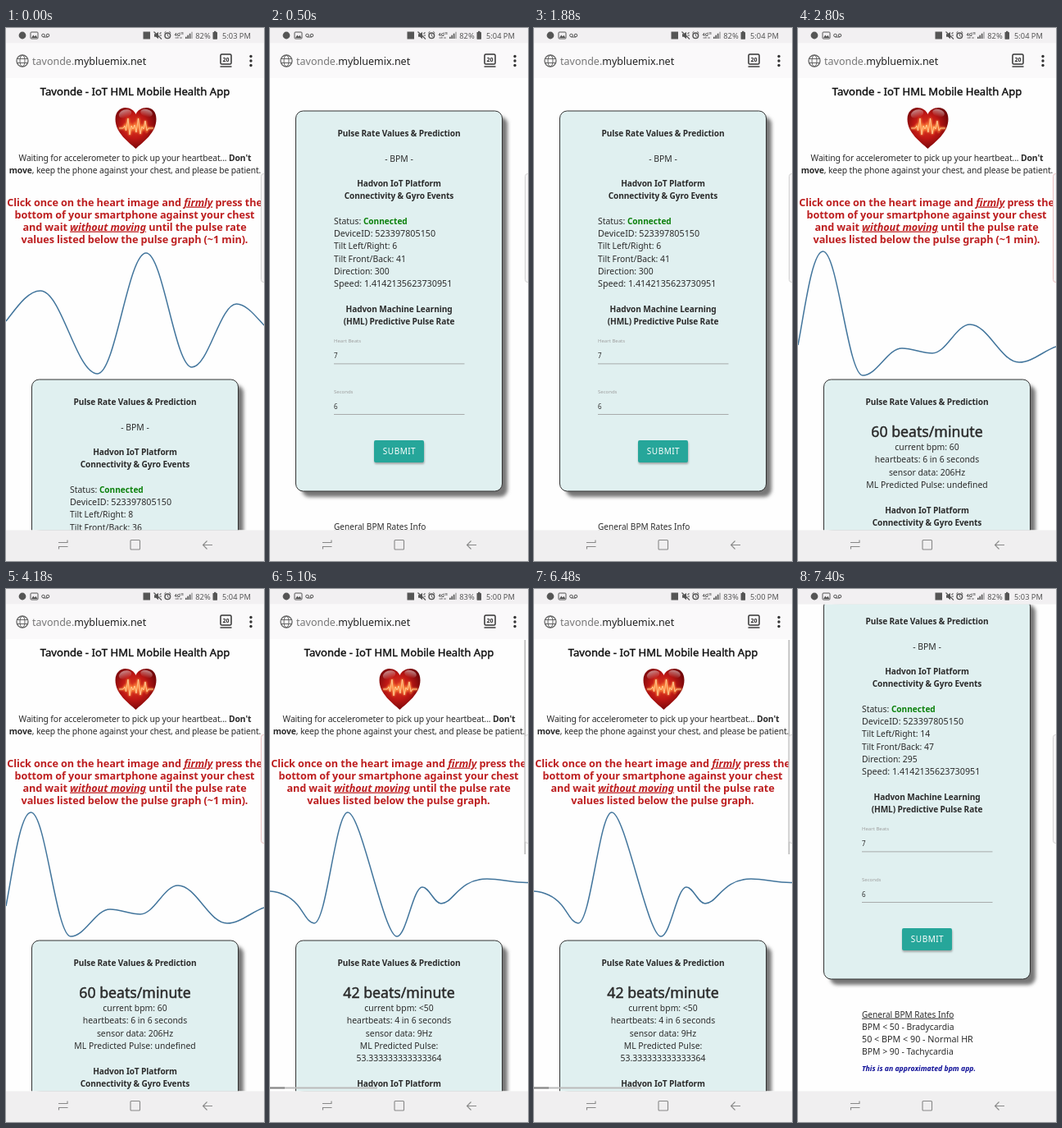
Write an HTML page that moves like this. It is 315x649 px and loops after 8 s.

```html
<!DOCTYPE html>
<html lang="en">
<head>
<meta charset="utf-8">
<title>Pulse app</title>
<style>
html, body { margin: 0; width: 100%; height: 100%; overflow: hidden; background: #fefefe; }
svg { display: block; width: 315px; height: 649px; }
text { font-family: "Noto Sans", "Open Sans", sans-serif; fill: #2b2b2b; font-size: 10.4px; }
.mid { text-anchor: middle; }
.para { letter-spacing: -.14px; }
.head { font-size: 10.1px; font-weight: 700; letter-spacing: -.1px; }
.title { font-size: 13.1px; fill: #111; stroke: #111; stroke-width: .4px; }
.red { font-size: 12.7px; font-weight: 700; letter-spacing: -.1px; fill: #bd1f20; }
.red tspan { font-style: italic; text-decoration: underline; }
.big { font-size: 17.7px; stroke: #2b2b2b; stroke-width: .45px; }
.num { font-size: 10.75px; }
.label { font-size: 6px; fill: #9e9e9e; }
.field { font-size: 8px; }
.btn { font-size: 10px; letter-spacing: .5px; fill: #fff; }
.under { font-size: 10.1px; text-decoration: underline; }
.note { font-size: 8.7px; font-weight: 700; font-style: italic; fill: #0b0b96; }
.ok { fill: #0b800b; font-weight: 700; font-size: 10.1px; }
.b { font-weight: 700; }
.url { font-size: 12.5px; fill: #777; }
.bar { font-size: 9.3px; fill: #555; }
</style>
</head>
<body>
<svg viewBox="0 0 315 649" xmlns="http://www.w3.org/2000/svg">
  <defs>
    <radialGradient id="heartFill" cx=".46" cy=".45" r=".6">
      <stop offset="0" stop-color="#e03a22"/>
      <stop offset=".5" stop-color="#bf1815"/>
      <stop offset="1" stop-color="#6c0508"/>
    </radialGradient>
    <linearGradient id="gloss" x2="0" y2="1">
      <stop offset="0" stop-color="#fff" stop-opacity=".5"/>
      <stop offset="1" stop-color="#fff" stop-opacity="0"/>
    </linearGradient>
    <filter id="soft" x="-10%" y="-10%" width="120%" height="120%"><feGaussianBlur stdDeviation="2"/></filter>
    <filter id="glow" x="-20%" y="-60%" width="140%" height="220%"><feGaussianBlur stdDeviation="1.3"/></filter>
    <clipPath id="view"><rect id="viewRect" x="0" y="61" width="315" height="551"/></clipPath>
  </defs>
  <rect width="315" height="649" fill="#fefefe"/>
  <g id="page" clip-path="url(#view)"></g>
  <g id="chrome"></g>
</svg>
<script>
const $ = id => document.getElementById(id);
const txt = (x, y, s, cls = "") => `<text x="${x}" y="${y}" class="${cls}">${s}</text>`;
const mid = (y, s, cls = "") => txt(157.5, y, s, "mid " + cls);
const red = (y, s) => txt(157, y, s, "mid red");
const rect = (x, y, w, h, fill, more = "") =>
  `<rect x="${x}" y="${y}" width="${w}" height="${h}" fill="${fill}" ${more}/>`;
const line = (d, color, w = 1, more = "") =>
  `<path d="${d}" fill="none" stroke="${color}" stroke-width="${w}" ${more}/>`;
const dot = (x, y, r, fill) => `<circle cx="${x}" cy="${y}" r="${r}" fill="${fill}"/>`;
const ring = (x, y, r, w = 1, color = "#666") =>
  `<circle cx="${x}" cy="${y}" r="${r}" fill="none" stroke="${color}" stroke-width="${w}"/>`;

// Smooth curve with level tangents at each crest and trough; a small k gives a straighter slope
function wave(start, peaks, end) {
  let d = start;
  peaks.slice(1).forEach(([x, y, k = .37], i) => {
    const [px, py] = peaks[i], dx = (x - px) * k;
    d += ` C${px + dx},${py} ${x - dx},${y} ${x},${y}`;
  });
  return line(d + end, "#42759c", 1.5);
}

function heart() {
  const ecg = "M138,122 h5 l2,-3 l1.5,6 l2.5,-15 l2,20 l2,-11 l2,4 l2,-5 l2,9 l2.5,-17 l2.5,19 l2,-9 l2,3 l2,-10 l2,12 l2,-3 h6";
  return `<path d="M158.5,147 C150,139 133.5,128 133.5,111 C133.5,102 139.5,97 145.5,97
    C151.5,97 156.5,100 158.5,105 C160.5,100 165.5,97 171.5,97 C178.5,97 183.5,102 183.5,111
    C183.5,128 167,139 158.5,147 Z" fill="url(#heartFill)"/>
    <ellipse cx="145.5" cy="104.5" rx="8" ry="5" fill="url(#gloss)" transform="rotate(-18 145.5 104.5)"/>
    <ellipse cx="171.5" cy="103.5" rx="7.5" ry="4.5" fill="url(#gloss)" transform="rotate(15 171.5 103.5)"/>`
    + line(ecg, "#ff8a3c", 2.6, 'filter="url(#glow)"')
    + line(ecg, "#ffe3b0", .7, 'stroke-linejoin="round"');
}

function header(lastLine) {
  return mid(82, "Tavonde - IoT HML Mobile Health App", "title") + heart()
    + mid(162, 'Waiting for accelerometer to pick up your heartbeat... <tspan class="b">Don\'t</tspan>', "para")
    + mid(177, '<tspan class="b">move</tspan>, keep the phone against your chest, and please be patient.', "para")
    + red(216.5, "Click once on the heart image and <tspan>firmly</tspan> press the")
    + red(231.5, "bottom of your smartphone against your chest")
    + red(246.5, "and wait <tspan>without moving</tspan> until the pulse rate")
    + red(261.5, lastLine);
}

function field(y, label, value) {
  return txt(78, y, label, "label") + txt(78, y + 19, value, "field")
    + rect(78, y + 25.5, 159.5, .8, "#9a9a9a");
}

function card(top, s) {
  const box = 'rx="9"';
  let out = rect(39, 7, 251, 463, "#777", box + ' filter="url(#soft)"')
    + rect(31.5, 0, 252, 463, "#e0f0f0", box + ' stroke="#333" stroke-width="1"')
    + mid(31, "Pulse Rate Values &amp; Prediction", "head");
  let y = 92;
  if (s.result) {
    const [rate, ...rows] = s.result;
    out += mid(70, rate + " beats/minute", "big");
    rows.forEach((r, i) => out += mid(86 + i * 15.3, r));
    y = 86 + rows.length * 15.3 + 15.3;
  } else out += mid(61.7, "- BPM -");
  out += mid(y, "Hadvon IoT Platform", "head") + mid(y + 15.2, "Connectivity &amp; Gyro Events", "head");
  if (s.gyro) {
    const [side, front, dir] = s.gyro;
    out += txt(78, 138, 'Status: <tspan class="ok">Connected</tspan>')
      + txt(78, 153, "DeviceID: 523397805150", "num")
      + txt(78, 168.3, "Tilt Left/Right: " + side)
      + txt(78, 183.5, "Tilt Front/Back: " + front)
      + txt(78, 198.7, "Direction: " + dir)
      + txt(78, 214, "Speed: 1.4142135623730951", "num")
      + mid(245, "Hadvon Machine Learning", "head")
      + mid(260, "(HML) Predictive Pulse Rate", "head")
      + field(282, "Heart Beats", 7) + field(343.5, "Seconds", 6)
      + rect(127.5, 403, 61, 27, "#777", 'rx="2" opacity=".6" filter="url(#glow)"')
      + rect(127, 401, 61, 27, "#26a69a", 'rx="2"')
      + txt(158, 418.3, "SUBMIT", "btn mid")
      + txt(78, 509.7, "General BPM Rates Info", "under")
      + txt(78, 525, "BPM &lt; 50 - Bradycardia")
      + txt(78, 540, "50 &lt; BPM &lt; 90 - Normal HR", "num")
      + txt(78, 555.3, "BPM &gt; 90 - Tachycardia")
      + txt(78, 575, "This is an approximated bpm app.", "note");
  }
  return `<g transform="translate(0 ${top})">${out}</g>`;
}

function statusBar(s) {
  const c = "#555";
  let out = rect(0, 0, 315, 18.5, "#f2f0f2") + dot(20, 9, 4.4, c)
    + rect(30, 5, 9, 8, "none", `rx="1" stroke="${c}"`)
    + `<path d="M31,12 l2.3,-3.5 l1.6,2 l1.5,-1.7 l2,3.2 z" fill="${c}"/>`
    + ring(45.5, 9, 1.8, 1, c) + ring(51, 9, 1.8, 1, c) + line("M45.5,11 H51", c)
    + rect(167.5, 4.5, 8.5, 9, c)
    + `<path d="M181,7.3 h2 l3,-2.6 v8.6 l-3,-2.6 h-2 z" fill="${c}"/>`
    + line("M180.5,4.5 L190,13.5 M187.5,7 l2,-1.5 M187.5,9 h2.5", c, 1.2)
    + ring(197.3, 9.3, 3.3, 1.5, c) + line("M197.3,7.2 v2.3 l1.5,1 M193.3,6 l2,-1.8 M201.3,6 l-2,-1.8", c)
    + `<text x="205.5" y="9.5" font-weight="700" style="font-size:5.6px;fill:${c}">4G</text>`
    + `<text x="212" y="8" font-weight="700" style="font-size:3px;fill:${c}">LTE</text>`
    + line("M206.5,12 h4 m-1.2,-1.2 l1.4,1.2 M215,12 h-3", c, .8);
  for (let i = 0; i < 4; i++) {
    const h = 2.3 + i * 2;
    out += rect(219 + i * 2.4, 13 - h, 1.6, h, i < 3 ? c : "#aaa");
  }
  return out + txt(231.3, 13, s.power + "%", "bar")
    + rect(252.5, 5, 5.5, 8.7, c, 'rx=".6"') + rect(254, 3.8, 2.5, 1.5, c)
    + txt(264, 13, s.clock + " PM", "bar");
}

function toolbar() {
  const g = "#666";
  return rect(0, 18.5, 315, 42.5, "#faf9fa")
    + ring(20, 40, 7, 1.3, g) + `<ellipse cx="20" cy="40" rx="3" ry="7" fill="none" stroke="${g}"/>`
    + line("M14,37.5 H26 M14,42.5 H26", g)
    + txt(32, 44.5, 'tavonde.<tspan fill="#222">mybluemix.net</tspan>', "url")
    + rect(262, 32, 13, 12, "none", 'rx="1.6" stroke="#333" stroke-width="1.5"')
    + line("M261.5,47 H275.5", "#333", 1.4)
    + `<text x="268.5" y="40.7" class="mid b" style="font-size:7px">20</text>`
    + [34.5, 40, 45.5].map(y => dot(299, y, 1.7, "#333")).join("");
}

function navBar() {
  const g = "#888";
  return rect(0, 611.5, 315, 37.5, "#f0eff0")
    + line("M64,626.5 H75 V623.5 M75.5,631.5 H64.5 V634.5", g, 1.1)
    + rect(152, 623.5, 11.5, 11.5, "none", `rx="1" stroke="${g}" stroke-width="1.1"`)
    + line("M252,629.5 H240.5 M245.5,624.5 L240.5,629.5 L245.5,634.5", g, 1.1);
}

const scrollBars = () => rect(310.5, 62, 1.7, 261, "#bbb")
  + rect(0, 606.5, 131, 2, "#bbb") + rect(0, 606.5, 18, 2, "#888");

const ask = "values listed below the pulse graph (~1 min).";
const scenes = [
  { end: 500, top: 428, power: 82, clock: "5:03", gyro: [8, 36, 300], ask,
    graph: wave("M0,357 C12,342 26,320 42,320",
      [[42, 320], [111.7, 421], [171, 274], [227, 413], [281.5, 336]], " C293,336 304,350 315,362") },
  { end: 2800, top: 101, power: 82, clock: "5:04", gyro: [6, 41, 300] },
  { end: 5100, top: 428, power: 82, clock: "5:04", ask, edge: "#e8b9b9",
    result: ["60", "current bpm: 60", "heartbeats: 6 in 6 seconds", "sensor data: 206Hz",
      "ML Predicted Pulse: undefined"],
    graph: wave("M0,386 C8,345 17,272 30.5,272",
      [[30.5, 272], [79, 423], [127, 390], [164, 396], [210, 361], [270, 407]], " C286,407 300,393 315,388") },
  { end: 7400, top: 428, power: 83, clock: "5:00", bars: true,
    ask: "values listed below the pulse graph.",
    result: ["42", "current bpm: &lt;50", "heartbeats: 4 in 6 seconds", "sensor data: 9Hz",
      "ML Predicted Pulse:", "53.333333333333364"],
    graph: wave("M0,368 C14,369 25,375 33,384 S46,407 54,407",
      [[54, 407], [95, 272], [155, 423, .27], [186, 363], [209, 383]],
      " C224,383 230,353 265,353 C282,353 298,358 315,357.5") },
  { end: 8000, top: 12, power: 82, clock: "5:03", gyro: [14, 47, 295], full: true }
];

let shown;
function show(s) {
  if (s === shown) return;
  shown = s;
  const y = s.full ? 18.5 : 61;
  $("viewRect").setAttribute("y", y);
  $("viewRect").setAttribute("height", 611.5 - y);
  $("page").innerHTML = (s.ask ? header(s.ask) + s.graph : "") + card(s.top, s)
    + (s.bars ? scrollBars() : "");
  $("chrome").innerHTML = statusBar(s) + (s.full ? "" : toolbar()) + navBar()
    + rect(311.5, 177.5, 8, 132, "#f6f5f6", `rx="3" stroke="${s.edge || "#ccc"}" stroke-width=".9"`);
}

function tick() {
  const t = performance.now() % 8000;
  show(scenes.find(s => t < s.end));
  requestAnimationFrame(tick);
}
tick();
</script>
</body>
</html>
```
